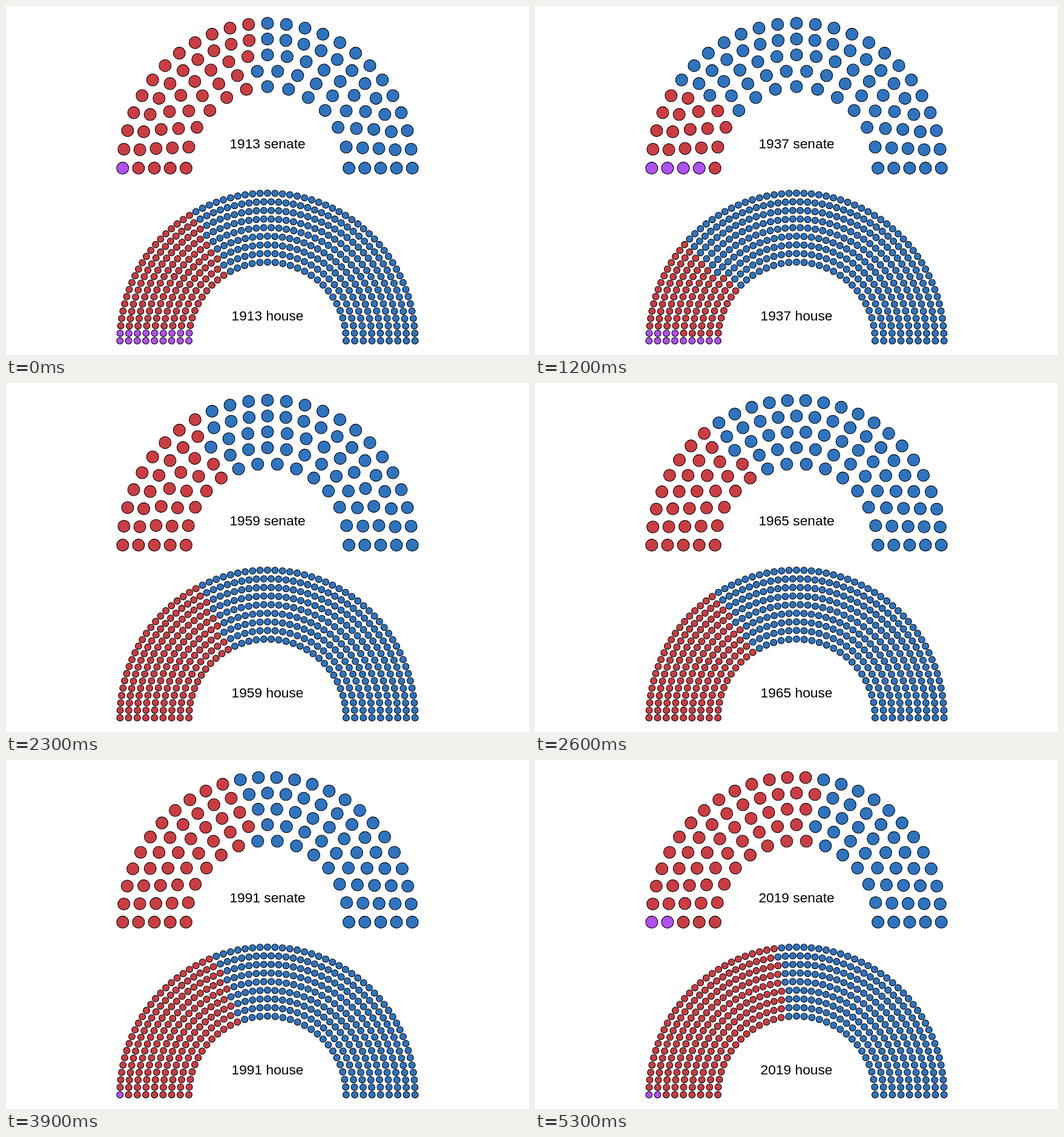
An HTML page with a canvas for the animation above (5.4 s loop, 864 px wide and 576 px high).

```html
<!DOCTYPE html>
<html lang="en">
<head>
<meta charset="utf-8">
<title>Seats by year</title>
<style>
  html, body { margin: 0; width: 100%; height: 100%; overflow: hidden; background: #fff; }
  canvas { display: block; }
</style>
</head>
<body>
<canvas id="stage" width="864" height="576"></canvas>
<script>
const ctx = document.getElementById('stage').getContext('2d');
const STEP_MS = 100, FIRST_YEAR = 1913, YEARS_PER_STEP = 2, STEPS = 54;
const CENTER_X = 432;
const RED = '#cb3d42', BLUE = '#2e74c0', PURPLE = '#b150f0';
const ROW_SPREAD = 0.307; // how much fuller the outermost row is than the average row

// Turning points as [year, senate, house]; the years between are interpolated.
const blueKeys = [
  [1913, 51, 290], [1921, 37, 132], [1923, 43, 207], [1929, 39, 163], [1937, 75, 333],
  [1947, 45, 188], [1949, 54, 263], [1953, 47, 213], [1959, 64, 283], [1965, 68, 295],
  [1973, 56, 242], [1977, 61, 292], [1981, 46, 242], [1991, 56, 267], [1995, 47, 204],
  [2005, 44, 202], [2009, 57, 257], [2011, 51, 193], [2019, 45, 235]
];
const purpleKeys = [
  [1913, 1, 18], [1923, 2, 3], [1931, 1, 1], [1937, 4, 13], [1949, 0, 1], [1965, 0, 0],
  [1973, 2, 1], [1983, 0, 0], [1991, 0, 1], [2007, 2, 0], [2019, 2, 2]
];
const sizeKeys = [[1957, 96, 435], [1961, 100, 437], [1963, 100, 435]];

const chambers = [
  { name: 'senate', column: 1, rows: 5, y: 267.6, textY: 235, outer: 239.2, inner: 134.6, dot: 9.96 },
  { name: 'house', column: 2, rows: 9, y: 552.5, textY: 519, outer: 243.7, inner: 129.9, dot: 5.4 }
];

function valueAt(keys, year, column) {
  const next = keys.findIndex(key => key[0] >= year);
  if (next < 0) return keys[keys.length - 1][column];
  if (next === 0) return keys[0][column];
  const a = keys[next - 1], b = keys[next];
  const part = (year - a[0]) / (b[0] - a[0]);
  return Math.round(a[column] + (b[column] - a[column]) * part);
}

// Shares the seats out from the inner row, in proportion to each row's weight.
function rowCounts(total, rows) {
  const weights = Array.from({ length: rows }, (_, i) => 1 + ROW_SPREAD * (2 * i / (rows - 1) - 1));
  let weightLeft = rows, seatsLeft = total;
  return weights.map(weight => {
    const count = Math.round(seatsLeft * weight / weightLeft);
    seatsLeft -= count;
    weightLeft -= weight;
    return count;
  });
}

// Seats in filling order: by angle from the left, outer rows first on ties.
function layout(chamber, total) {
  const { rows, inner, outer, y } = chamber;
  return rowCounts(total, rows).flatMap((count, row) => {
    const radius = inner + (outer - inner) * row / (rows - 1);
    return Array.from({ length: count }, (_, i) => {
      const turn = i / (count - 1), angle = turn * Math.PI;
      return { turn, row, x: CENTER_X - radius * Math.cos(angle), y: y - radius * Math.sin(angle) };
    });
  }).sort((a, b) => a.turn - b.turn || b.row - a.row);
}

function drawChamber(chamber, year) {
  const [total, blue, purple] = [sizeKeys, blueKeys, purpleKeys]
    .map(keys => valueAt(keys, year, chamber.column));
  layout(chamber, total).forEach((seat, i) => {
    ctx.fillStyle = i < purple ? PURPLE : i < total - blue ? RED : BLUE;
    ctx.beginPath();
    ctx.arc(seat.x, seat.y, chamber.dot, 0, Math.PI * 2);
    ctx.fill();
    ctx.stroke();
  });
  ctx.fillStyle = '#000';
  ctx.fillText(`${year} ${chamber.name}`, CENTER_X, chamber.textY);
}

ctx.font = '22.76px "Liberation Sans", Arial, sans-serif';
ctx.textAlign = 'center';
ctx.strokeStyle = '#000';
ctx.lineWidth = 1.05;
const start = performance.now();
let shown = -1;

function draw() {
  const step = Math.floor((performance.now() - start) / STEP_MS) % STEPS;
  if (step !== shown) {
    shown = step;
    ctx.fillStyle = '#fff';
    ctx.fillRect(0, 0, 864, 576);
    chambers.forEach(chamber => drawChamber(chamber, FIRST_YEAR + step * YEARS_PER_STEP));
  }
  requestAnimationFrame(draw);
}
draw();
</script>
</body>
</html>
```
